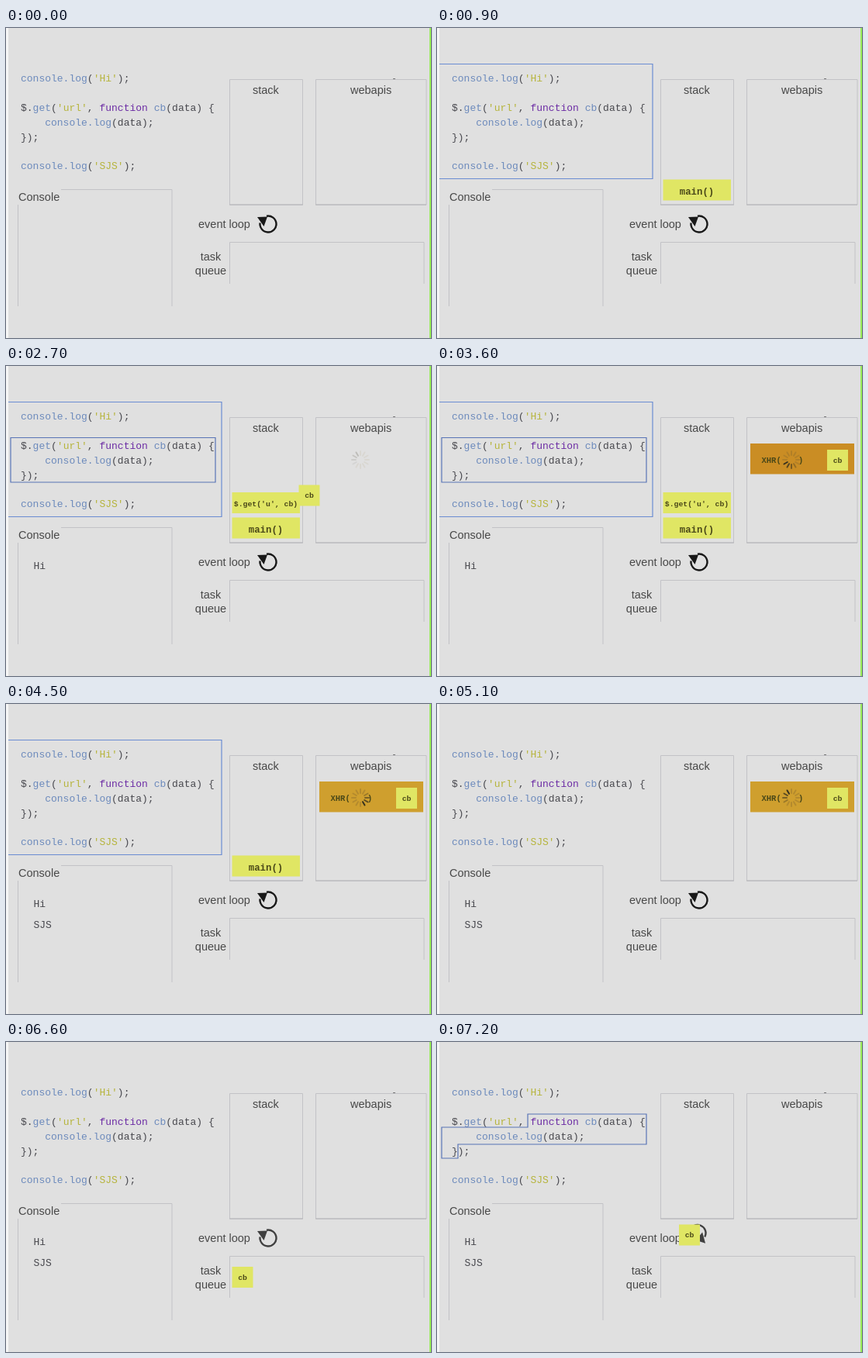
An HTML page for the animation above (7.5 s loop, 548 by 400 pixels).

```html
<!DOCTYPE html>
<html lang="en">
<head>
<meta charset="utf-8">
<title>Event loop</title>
<style>
html, body { margin: 0; width: 100%; height: 100%; overflow: hidden; background: #e0e0e0; }
svg { display: block; }
text { white-space: pre; }
.label { font: 14.5px "Liberation Sans", Arial, sans-serif; fill: #484848; }
.code, .block { font-family: "Liberation Mono", "Courier New", monospace; }
.code { font-size: 13px; fill: #48484e; }
.block { font-weight: bold; font-size: 9.8px; fill: #4a4818; text-anchor: middle; }
.block .big { font-size: 12.3px; }
.id { fill: #6c8abc; }
.str { fill: #b6b43c; }
.key { fill: #6c2ca4; }
.frame { fill: none; stroke: #c2c2c6; stroke-width: 1; }
.mark { fill: none; stroke: #5874b6; stroke-width: 1.2; }
.note { fill: #e0e664; }
</style>
</head>
<body>
<svg width="548" height="400" viewBox="0 0 548 400">
  <rect width="548" height="400" fill="#e0e0e0"/>
  <rect width="3" height="400" fill="#f6f6f6"/>
  <rect x="546" width="2" height="400" fill="#98ec58"/>

  <g class="frame">
    <path d="M288.5 66.5H382.5V228H288.5ZM399.5 66.5H542V228H399.5Z"/>
    <path d="M71 208.5H214V359M15.5 228V359M288.5 330V276.5H539V330"/>
    <path d="M288 228H383M399 228H542" stroke="#b4b4b8"/>
    <path d="M499 65.5H502" stroke="#777"/>
  </g>

  <g class="label">
    <text x="318" y="85">stack</text>
    <text x="444" y="85">webapis</text>
    <text x="16" y="223">Console</text>
    <text x="248" y="258">event loop</text>
    <text x="264" y="300" text-anchor="middle">task</text>
    <text x="264" y="318" text-anchor="middle">queue</text>
  </g>

  <g class="code">
    <text x="19" y="68.5"><tspan class="id">console.log</tspan>(<tspan class="str">'Hi'</tspan>);</text>
    <text x="19" y="106.5">$.<tspan class="id">get</tspan>(<tspan class="str">'url'</tspan>, <tspan class="key">function</tspan> <tspan class="id">cb</tspan>(data) {</text>
    <text x="19" y="125.5">    <tspan class="id">console.log</tspan>(data);</text>
    <text x="19" y="144.5">});</text>
    <text x="19" y="182"><tspan class="id">console.log</tspan>(<tspan class="str">'SJS'</tspan>);</text>
    <text x="35.5" y="262" data-on="4-24">Hi</text>
    <text x="35.5" y="288.5" data-on="14-24">SJS</text>
  </g>

  <!-- code highlights -->
  <g class="mark">
    <path data-on="1-16" stroke="#6a8cd2" d="M3 46.5H278V194.5H3"/>
    <path data-on="4-4" d="M6 52H165V78H6Z"/>
    <path data-on="6-12" d="M6 92.5H270V150H6Z"/>
    <path data-on="14-14" d="M6 165H172V190H6Z"/>
    <path data-on="23-24" d="M117 93H270V132H27V150H6V110H117Z"/>
  </g>

  <!-- call stack -->
  <g class="block">
    <g data-on="1-16"><use href="#slot" y="32.5"/><text class="big" x="335" y="214.5">main()</text></g>
    <g data-on="4-4"><use href="#slot"/><text x="335" y="181">log('Hi')</text></g>
    <g data-on="6-12"><use href="#slot"/><text x="335" y="181">$.get('u', cb)</text></g>
    <g data-on="14-14"><use href="#slot"/><text x="335" y="181">log('SJS')</text></g>
  </g>
  <defs><rect id="slot" class="note" x="291.5" y="163" width="87.5" height="27"/></defs>

  <!-- pending request -->
  <g data-on="10-21" class="block" style="text-anchor:start;font-size:10.5px">
    <rect id="xhr" x="404" y="100" width="134" height="39.5"/>
    <text x="418.5" y="124.5">XHR(</text><text x="466" y="124.5">)</text>
  </g>
  <g id="spinner" data-on="9-19" transform="translate(457 121)" stroke-width="2" stroke-linecap="round"></g>
  <path data-on="20-21" fill="#3e4248" d="M447 121.5L451 119.5L454.5 124C457 119 461 115 466.5 112.5L467.5 114C462 118 458.5 123 456 130H453Z"/>

  <g id="loop">
    <path fill="none" stroke="currentColor" stroke-width="2.4" d="M-2 -10.3A10.5 10.5 0 1 1 -10.4 -1.5"/>
    <path fill="currentColor" d="M-14 -9L-1 -9.5L-5.500 3Z"/>
  </g>

  <g id="cb" data-on="9-24" class="block">
    <rect class="note" x="-13.5" y="-13.5" width="27" height="27"/>
    <text y="3">cb</text>
  </g>
</svg>
<script>
const STEP = 300, COUNT = 25;
const $ = id => document.getElementById(id);
const timed = [...document.querySelectorAll('[data-on]')].map(el => [el, ...el.dataset.on.split('-').map(Number)]);

const spokes = Array.from({ length: 12 }, (_, i) => {
  const line = document.createElementNS('http://www.w3.org/2000/svg', 'path');
  line.setAttribute('d', 'M6 0H11');
  line.setAttribute('transform', `rotate(${i * 30})`);
  return $('spinner').appendChild(line);
});

// Resting and travelling places of the callback, by first step
const cbStops = [[9, 391, 167], [10, 516.5, 121.5], [21, 353.5, 265], [22, 305, 303.5], [24, 325.5, 249]];
const loopPoses = { 23: 'translate(337 251) rotate(-80)', 24: 'translate(336 246.5) rotate(-160)' };

function draw(now) {
  const step = Math.floor(now / STEP) % COUNT;
  for (const [el, from, to] of timed) el.style.display = step >= from && step <= to ? '' : 'none';

  const stop = cbStops.filter(s => s[0] <= step).pop();
  if (stop) $('cb').setAttribute('transform', `translate(${stop[1]} ${stop[2]})`);

  const head = (step * 3 + 5) % 12;
  spokes.forEach((line, i) => {
    const age = (head - i + 12) % 12;
    line.setAttribute('stroke', age < 4 ? '#38321f' : '#8d6c2c');
    line.setAttribute('opacity', age < 4 ? 1 - age * 0.22 : 0.4);
  });
  $('spinner').setAttribute('opacity', step === 9 ? 0.2 : 1);
  $('xhr').setAttribute('fill', step < 13 ? '#ca8d24' : '#cf9f2e');

  $('loop').setAttribute('transform', loopPoses[step] || 'translate(338 253)');
  $('loop').setAttribute('color', step >= 21 ? '#404040' : '#181818');
}

const start = performance.now();
function tick() {
  draw(performance.now() - start);
  requestAnimationFrame(tick);
}
tick();
</script>
</body>
</html>
```
